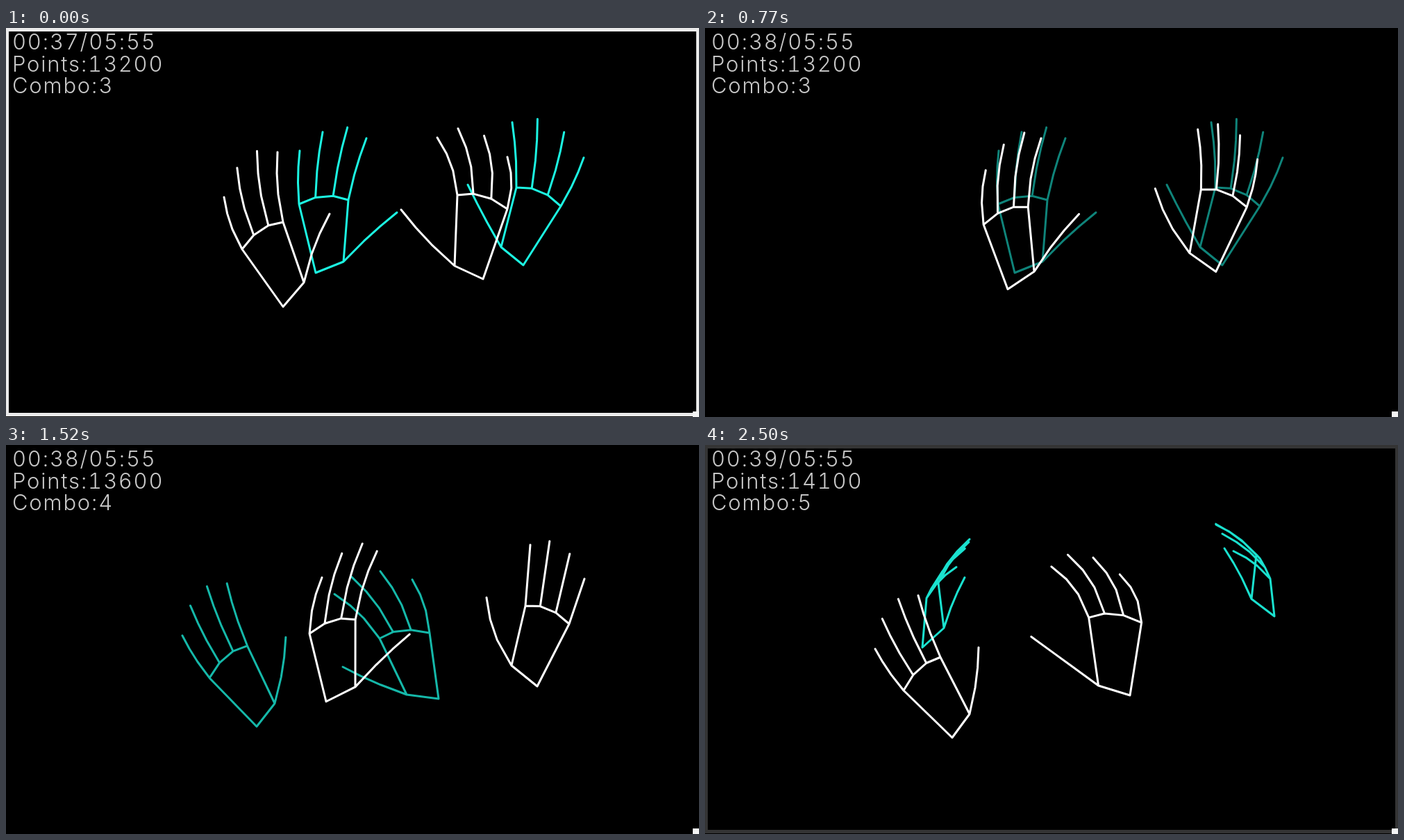
An HTML page with a canvas that plays this animation: 998 by 561 pixels, repeating every 2570 ms.

```html
<!DOCTYPE html>
<html lang="en">
<head>
<meta charset="utf-8">
<title>Hand rhythm game</title>
<style>
html, body { margin: 0; width: 100%; height: 100%; overflow: hidden; background: #000; }
canvas { display: block; }
pre {
  position: absolute; left: 9px; top: 4px; margin: 0;
  font: 300 31px/31.5px Inter, sans-serif;
  font-variant-numeric: tabular-nums;
  letter-spacing: 1.8px; color: #c8c8c8;
}
</style>
</head>
<body>
<canvas id="stage" width="998" height="561"></canvas>
<pre id="status"></pre>
<script>
const ctx = document.getElementById('stage').getContext('2d');
const status = document.getElementById('status');
const W = 998, H = 561, LOOP = 2570, TICKS = 37;

const mix = (a, b, u) => a + (b - a) * u;
const mixPoint = (p, q, u) => [mix(p[0], q[0], u), mix(p[1], q[1], u)];
const smooth = u => u * u * (3 - 2 * u);

// Thumb, index and little finger run from base to tip; the other two follow from them.
const hand = (wrist, thumb, index, little, bend, thumbBend) =>
  ({ points: [wrist, ...thumb, ...index, ...little], bends: [bend, thumbBend] });

// Shifts a hand and turns it about its wrist.
function move({ points, bends }, dx, dy, turn = 0) {
  const [wx, wy] = points[0], c = Math.cos(turn), s = Math.sin(turn);
  const place = ([x, y]) => [
    wx + dx + (x - wx) * c - (y - wy) * s,
    wy + dy + (x - wx) * s + (y - wy) * c
  ];
  return { points: points.map(place), bends };
}

const mixHand = (a, b, u) => ({
  points: a.points.map((p, i) => mixPoint(p, b.points[i], u)),
  bends: mixPoint(a.bends, b.bends, u)
});

const waitLeft = hand([399, 402], [[429, 367], [466, 268]], [[399, 280], [391, 179]], [[340, 319], [314, 244]], -4, -4);
const waitRight = hand([687, 362], [[646, 343], [569, 262]], [[650, 241], [621, 158]], [[722, 261], [722, 186]], 6, -3);
const reachLeft = hand([478, 355], [[521, 336], [603, 264]], [[526, 239], [562, 142]], [[459, 256], [481, 176]], -4, -2);
const reachRight = hand([780, 340], [[743, 310], [707, 212]], [[763, 224], [770, 136]], [[826, 250], [848, 185]], 0, -7);
const lowLeft = hand([348, 432], [[373, 398], [386, 302]], [[331, 316], [299, 227]], [[278, 364], [237, 304]], -2, 3);
const lowRight = hand([600, 392], [[556, 374], [466, 295]], [[551, 275], [504, 197]], [[626, 289], [601, 217]], 8, 0);

const poses = [
  { tick: 0, hands: [waitLeft, waitRight] },
  { tick: 7, hands: [move(waitLeft, -17, 5, 0.025), move(waitRight, -7, 4, 0.05)] },
  { tick: 14, hands: [move(reachLeft, -7, 2, -0.015), move(reachRight, -8, 2, 0.015)] },
  { tick: 17, hands: [reachLeft, reachRight] },
  { tick: 22, hands: [move(reachLeft, -17, 15, -0.05), move(reachRight, -15, 8)] },
  { tick: 30, hands: [lowLeft, lowRight] },
  { tick: 36, hands: [move(lowLeft, 8, -10), move(lowRight, 12, -31, -0.09)] }
];

const targets = [
  { from: 0, to: 12, hands: [
    hand([446, 353], [[486, 337], [563, 266]], [[493, 248], [519, 159]], [[422, 254], [423, 177]], -2, -2),
    hand([745, 342], [[713, 316], [665, 226]], [[735, 230], [729, 136]], [[799, 257], [832, 187]], 2, -1)] },
  { from: 16, to: 30, hands: [
    move(lowLeft, 13, -26, 0.03),
    hand([623, 366], [[577, 360], [485, 320]], [[538, 279], [473, 215]], [[610, 271], [585, 194]], 5, -2)] },
  { from: 34, to: TICKS, hands: [
    hand([313, 292], [[344, 264], [374, 191]], [[336, 199], [380, 140]], [[319, 221], [362, 176]], -4, -2),
    hand([820, 247], [[787, 222], [748, 149]], [[794, 158], [736, 115]], [[814, 193], [761, 153]], 4, 2)] }
];

const scores = [
  { hit: 0, points: 13200, combo: 3 },
  { hit: 12, points: 13600, combo: 4 },
  { hit: 30, points: 14100, combo: 5 }
];

function playerAt(tick) {
  const next = poses.findIndex(p => p.tick > tick);
  if (next < 0) return poses[poses.length - 1].hands;
  const a = poses[next - 1], b = poses[next];
  const u = smooth((tick - a.tick) / (b.tick - a.tick));
  return a.hands.map((h, i) => mixHand(h, b.hands[i], u));
}

function drawFinger([x0, y0], [x1, y1], bend) {
  const dx = x1 - x0, dy = y1 - y0, length = Math.hypot(dx, dy);
  ctx.moveTo(x0, y0);
  for (const t of [0.4, 0.7, 1]) {
    const bow = 4 * t * (1 - t) * bend / length;
    ctx.lineTo(x0 + dx * t - dy * bow, y0 + dy * t + dx * bow);
  }
}

function drawHand({ points, bends }, color) {
  const [wrist, thumbBase, thumbTip, indexBase, indexTip, littleBase, littleTip] = points;
  const fan = (from, to, bulge) => [
    from,
    ...[1 / 3, 2 / 3].map(u => mixPoint(wrist, mixPoint(from, to, u), 1 + bulge)),
    to
  ];
  const knuckles = fan(indexBase, littleBase, 0.075);
  const tips = fan(indexTip, littleTip, 0.115);
  ctx.strokeStyle = color;
  ctx.beginPath();
  [wrist, thumbBase, ...knuckles].forEach(p => ctx.lineTo(...p));
  ctx.closePath();
  drawFinger(thumbBase, thumbTip, bends[1]);
  knuckles.forEach((base, i) => drawFinger(base, tips[i], bends[0]));
  ctx.stroke();
}

function drawBorder(age) {
  const v = Math.max(0, 235 - 30.5 * age);
  ctx.fillStyle = `rgb(${v},${v},${v})`;
  ctx.fillRect(0, 0, W, H - 1);
  ctx.fillStyle = '#000';
  ctx.fillRect(4, 5, W - 8, 550);
  ctx.fillStyle = '#f4f4f4';
  ctx.fillRect(989, 553, 9, 8);
}

function render() {
  const time = performance.now() % LOOP;
  const tick = Math.min(TICKS - 1, Math.floor((time + 15) * TICKS / LOOP));
  const score = scores.filter(s => s.hit <= tick).pop();
  const second = 37 + Math.floor((time + 270) / 1000);
  status.textContent = `00:${second}/05:55\nPoints:${score.points}\nCombo:${score.combo}`;

  ctx.fillStyle = '#000';
  ctx.fillRect(0, 0, W, H);
  drawBorder(tick - score.hit);
  ctx.lineWidth = 3;
  ctx.lineCap = ctx.lineJoin = 'round';
  for (const { from, to, hands } of targets) {
    if (tick < from || tick >= to) continue;
    const glow = 1 - 0.042 * (tick - from);
    hands.forEach(h => drawHand(h, `rgb(${28 * glow},${246 * glow},${226 * glow})`));
  }
  playerAt(tick).forEach(h => drawHand(h, '#fff'));
  requestAnimationFrame(render);
}
requestAnimationFrame(render);
</script>
</body>
</html>
```
